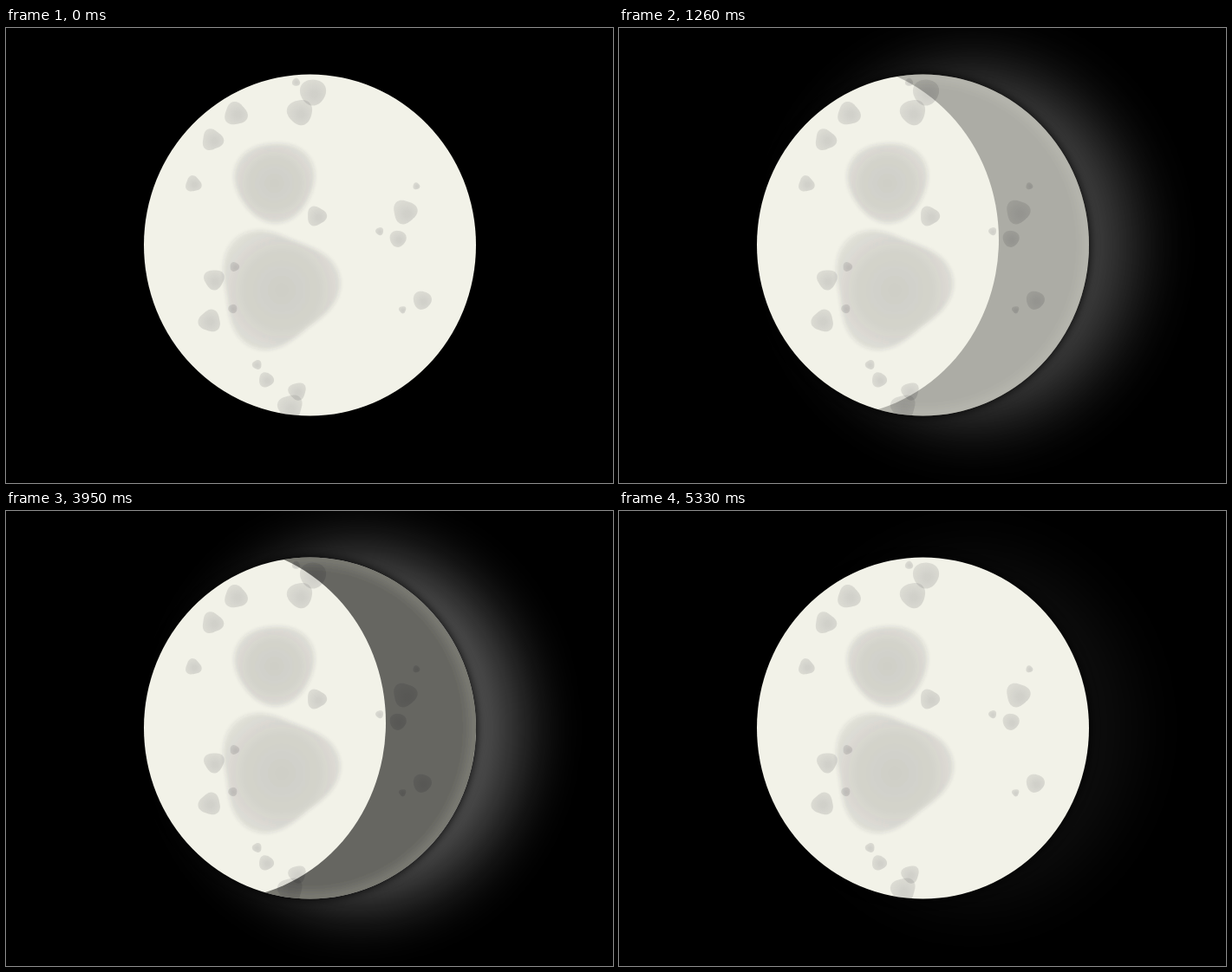
Animation of 700 by 525 pixels, one loop 5600 ms. Source, as an HTML page:

```html
<!DOCTYPE html>
<html lang="en">
<head>
<meta charset="utf-8">
<title>Moon phase</title>
<style>
  html, body { margin: 0; width: 100%; height: 100%; overflow: hidden; background: #000; }
  svg { display: block; width: 100%; height: 100%; }
  #sea stop, #pit stop { stop-color: #3c3a42; }
</style>
</head>
<body>
<svg viewBox="0 0 700 525">
  <defs>
    <ellipse id="disc" cx="350.5" cy="250.5" rx="191.5" ry="197"/>
    <clipPath id="inMoon"><use href="#disc"/></clipPath>
    <mask id="unlit" maskUnits="userSpaceOnUse" x="0" y="0" width="700" height="525">
      <use href="#disc" fill="#fff"/>
      <ellipse cx="246.5" cy="244" rx="191.5" ry="203.7"/>
    </mask>
    <filter id="wide" filterUnits="userSpaceOnUse" x="0" y="-100" width="800" height="725">
      <feGaussianBlur stdDeviation="37"/>
    </filter>
    <filter id="near" filterUnits="userSpaceOnUse" x="0" y="0" width="700" height="525">
      <feGaussianBlur stdDeviation="6"/>
    </filter>
    <filter id="soft"><feGaussianBlur stdDeviation="2"/></filter>
    <filter id="crisp"><feGaussianBlur stdDeviation=".5"/></filter>
    <radialGradient id="sea" r=".58">
      <stop offset="0" stop-opacity=".19"/>
      <stop offset=".55" stop-opacity=".17"/>
      <stop offset="1" stop-opacity=".09"/>
    </radialGradient>
    <radialGradient id="pit" cx=".56" cy=".57" r=".6">
      <stop offset=".2" stop-opacity=".18"/>
      <stop offset="1" stop-opacity=".12"/>
    </radialGradient>
  </defs>

  <rect width="700" height="525"/>
  <g id="glow" opacity="0">
    <ellipse cx="408" cy="250.5" rx="185" ry="203" fill="#fff" fill-opacity=".36" filter="url(#wide)"/>
  </g>
  <use href="#disc" filter="url(#near)"/>
  <use href="#disc" fill="#f2f2e8"/>
  <g id="craters" clip-path="url(#inMoon)"></g>
  <g id="shade" opacity="0">
    <g mask="url(#unlit)">
      <use href="#disc"/>
      <use href="#disc" fill="none" stroke="#262624" stroke-width="16" filter="url(#near)"/>
    </g>
  </g>
</svg>
<script>
const LOOP = 5600;
const TAU = 2 * Math.PI;
const $ = id => document.getElementById(id);

let seed = 7;
const random = () => (seed = seed * 16807 % 2147483647) / 2147483647;

// Round blob with three lobes, the first one pointing along `turn`.
function addCrater(x, y, radius, lobe, turn, fill, filter) {
  const points = Array.from({ length: 48 }, (_, i) => {
    const angle = i * TAU / 48;
    const r = radius * (1 + lobe * Math.cos(3 * (angle - turn)));
    return [x + r * Math.cos(angle), y + r * Math.sin(angle)];
  });
  const shape = document.createElementNS('http://www.w3.org/2000/svg', 'polygon');
  const attrs = { points: points.join(' '), fill: `url(#${fill})`, filter: `url(#${filter})` };
  for (const name in attrs) shape.setAttribute(name, attrs[name]);
  $('craters').append(shape);
}
const addPit = (x, y, r) => addCrater(x, y, r, .04 + .08 * random(), TAU * random(), 'pit', 'crisp');

addCrater(310, 177, 46, .05, -.6, 'sea', 'soft');
addCrater(312, 300, 66, .12, 1.95, 'sea', 'soft');

// Pit centres from the largest to the smallest; every other one has a pebble nearby.
const pits = [
  [354, 74], [339, 97], [328, 437], [460, 212], [265, 99], [235, 338], [238, 129],
  [240, 290], [358, 217], [480, 314], [336, 419], [452, 243], [216, 180], [300, 406]
];
pits.forEach(([x, y], i) => {
  const r = 15 - .5 * i;
  addPit(x, y, r);
  if (i % 2) {
    const angle = TAU * random();
    addPit(x + 2.4 * r * Math.cos(angle), y + 2.4 * r * Math.sin(angle), 3.5 + 2 * random());
  }
});

const clamp = v => Math.min(1, Math.max(0, v));
const rise = (t, from, to) => clamp((t - from) / (to - from));
const shadeAt = t => .65 * (rise(t, 900, 1710) - rise(t, 3860, 4705));
const glowAt = t => rise(t, 0, 1710) - rise(t, 3860, LOOP);

// The picture holds between steps: slow ones for the glow, quick ones for the shade.
const steps = (from, to, gap) => Array.from({ length: (to - from) / gap + 1 }, (_, i) => from + gap * i);
const times = [
  0, ...steps(360, 690, 330), ...steps(990, 1710, 90),
  ...steps(3950, 4670, 90), ...steps(5000, 5330, 330), LOOP
];

function play(id, valueAt) {
  const frames = times.map(t => ({ offset: t / LOOP, opacity: valueAt(t), easing: 'step-end' }));
  $(id).animate(frames, { duration: LOOP, iterations: Infinity });
}
play('shade', shadeAt);
play('glow', glowAt);
</script>
</body>
</html>
```
